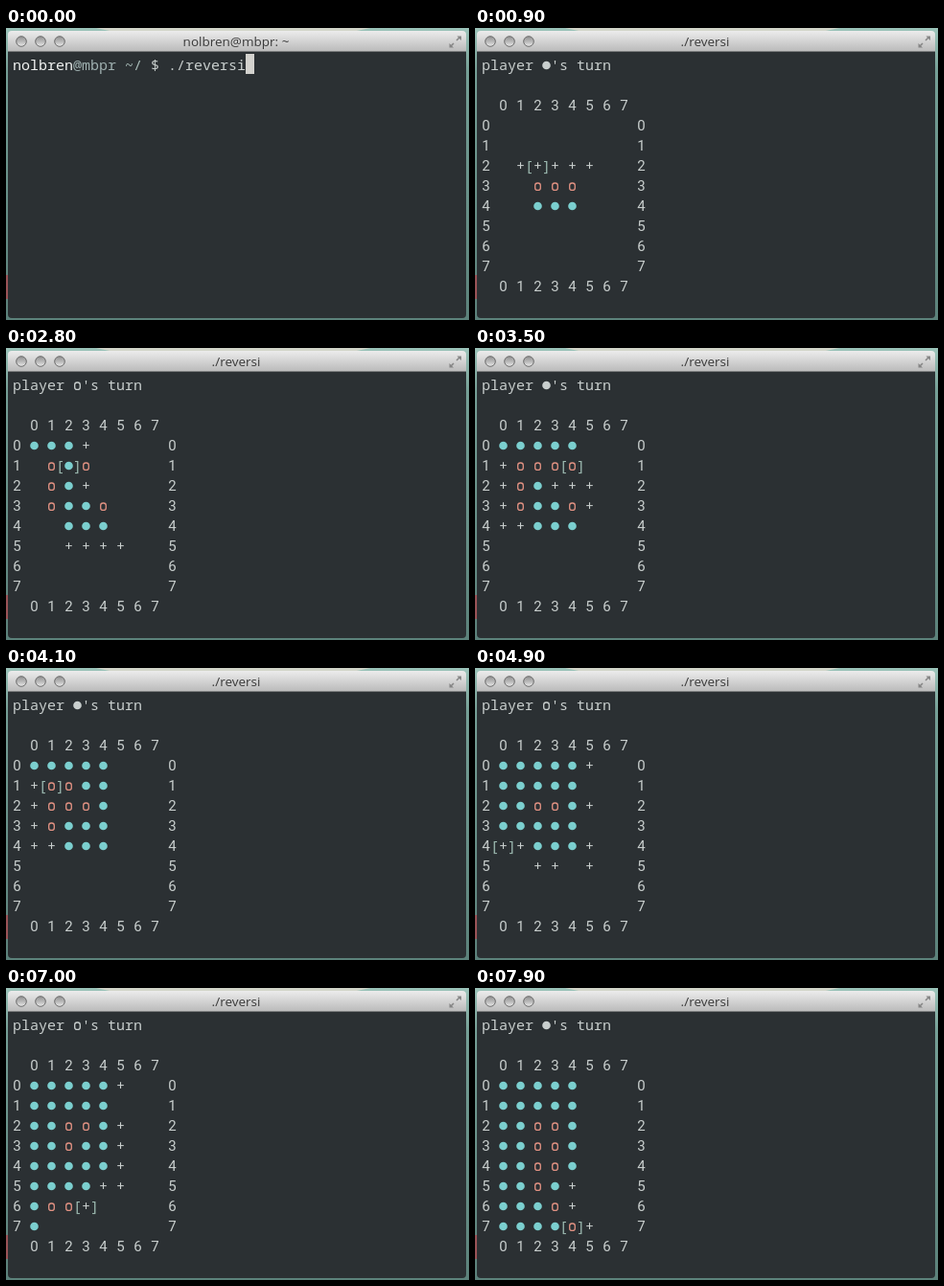
Write an HTML page that moves like this. It is 483 px wide and 305 px high and loops after 8000 ms.

```html
<!DOCTYPE html>
<html lang="en">
<head>
<meta charset="utf-8">
<title>./reversi</title>
<style>
  html, body { margin: 0; width: 100%; height: 100%; overflow: hidden; background: #7fa79d; }
  svg { display: block; width: 483px; height: 305px; }
  text { white-space: pre; text-anchor: middle; }
  #title { font: 13.5px "Open Sans", "Noto Sans", sans-serif; fill: #3a3a3a; }
  #screen { font: 15px "Noto Sans Mono", "DejaVu Sans Mono", monospace; fill: #c9cfce; }
  .digit { font-family: Roboto, "Liberation Sans", sans-serif; }
  .user { fill: #f1f3f2; }
  .host { fill: #9fb0b0; }
  .path { fill: #a9bdb9; }
  .mark { fill: #9dbab1; }
  .dark { fill: #7bcfcf; }
  .ring { fill: none; stroke: #c9cfce; stroke-width: 1.3; }
  .light { stroke: #e29283; }
</style>
</head>
<body>
<svg viewBox="0 0 483 305">
  <defs>
    <linearGradient id="bar" x2="0" y2="1">
      <stop offset="0" stop-color="#ececec"/>
      <stop offset="1" stop-color="#b9b9b9"/>
    </linearGradient>
    <linearGradient id="knob" x2="0" y2="1">
      <stop offset="0" stop-color="#8f8f8f"/>
      <stop offset=".55" stop-color="#bcbcbc"/>
      <stop offset="1" stop-color="#ededed"/>
    </linearGradient>
    <linearGradient id="desk" x2="0" y2="1">
      <stop offset="0" stop-color="#9cc4ba"/>
      <stop offset=".15" stop-color="#759f96"/>
      <stop offset="1" stop-color="#5c827b"/>
    </linearGradient>
  </defs>
  <rect width="483" height="305" fill="url(#desk)"/>
  <path d="M94 0H380L366 3H108Z" fill="#d3d6ca"/>
  <rect y="258" width="3" height="25" fill="#9b5357"/>
  <path d="M2 20H480V299a4 4 0 0 1-4 4H6a4 4 0 0 1-4-4Z" fill="#2b3033"/>
  <path d="M2 25V7a4 4 0 0 1 4-4H476a4 4 0 0 1 4 4V25Z" fill="url(#bar)"/>
  <rect x="2" y="24" width="478" height="1" fill="#77797a"/>
  <g fill="url(#knob)" stroke="#6c6c6c">
    <circle cx="16" cy="14" r="5.3"/>
    <circle cx="36" cy="14" r="5.3"/>
    <circle cx="56" cy="14" r="5.3"/>
  </g>
  <g fill="#858585" stroke="#858585" stroke-width="1.5">
    <path d="M470 13l3-3M467 16l-3 3" fill="none"/>
    <path d="M470.5 8.5h4.5v4.5ZM462.5 16v4.5h4.5Z" stroke="none"/>
  </g>
  <text id="title" x="240" y="18.5"></text>
  <g id="screen"></g>
</svg>
<script>
const CELL = 9, LINE = 21, SIZE = 8, STEP = 100, LOOP = 8000, START = 200;
const USER = "nolbren", HOST = "mbpr";

// One word per step: h j k l move the cursor, x places a piece, a dot waits.
const KEYS = `. h h x k x k x . jh x k x k x kh x l x l x . jl x h x kl x l .
  x j x j x h x kh h hx . j x j . x j x l . x jh x l x jlx hx . h x j x kl .
  kl x lx j x jh h x l x l x lx`.split(/\s+/);

const cellX = col => 7 + CELL * (col + .5);
const lineY = row => 39 + LINE * row;

const glyph = (ch, col, row, cls = "") => ch === " " ? "" :
  `<text x="${cellX(col)}" y="${lineY(row) + 5.3}" class="${/\d/.test(ch) ? "digit" : cls}">${ch}</text>`;

const write = (str, col, row, cls) =>
  [...str].map((ch, i) => glyph(ch, col + i, row, cls)).join("");

const disc = (col, row, cls = "") =>
  `<circle cx="${cellX(col)}" cy="${lineY(row)}" r="4.3" class="${cls}"/>`;

const ring = (col, row, cls = "") =>
  `<rect x="${cellX(col) - 2.8}" y="${lineY(row) - 3}" width="5.6" height="7.4" rx="2.5" class="ring ${cls}"/>`;

// Reversi rules: 1 is dark, -1 is light, 0 is empty.
const board = Array.from({ length: SIZE }, () => Array(SIZE).fill(0));
board[3][3] = board[4][4] = 1;
board[3][4] = board[4][3] = -1;
let turn = 1, curRow = 4, curCol = 4;

const at = (r, c) => board[r]?.[c] ?? 0;

function flips(r, c) {
  const found = [];
  if (at(r, c)) return found;
  for (let dr = -1; dr <= 1; dr++)
    for (let dc = -1; dc <= 1; dc++) {
      const run = [];
      let y = r + dr, x = c + dc;
      while (at(y, x) === -turn) {
        run.push([y, x]);
        y += dr;
        x += dc;
      }
      if (at(y, x) === turn) found.push(...run);
    }
  return found;
}

function press(key) {
  if (key === "h") curCol--;
  if (key === "l") curCol++;
  if (key === "k") curRow--;
  if (key === "j") curRow++;
  if (key !== "x") return;
  const taken = flips(curRow, curCol);
  if (!taken.length) return;
  for (const [r, c] of [[curRow, curCol], ...taken]) board[r][c] = turn;
  turn = -turn;
}

function drawGame() {
  let out = write("player", 0, 0) + (turn > 0 ? disc : ring)(7, 0) + write("'s turn", 8, 0);
  for (let i = 0; i < SIZE; i++) {
    out += glyph(String(i), 2 + 2 * i, 2) + glyph(String(i), 2 + 2 * i, 11);
    out += glyph(String(i), 0, 3 + i) + glyph(String(i), 18, 3 + i);
    for (let c = 0; c < SIZE; c++) {
      const col = 2 + 2 * c, row = 3 + i, piece = board[i][c];
      if (piece > 0) out += disc(col, row, "dark");
      else if (piece < 0) out += ring(col, row, "light");
      else if (flips(i, c).length) out += glyph("+", col, row);
    }
  }
  const col = 2 + 2 * curCol, row = 3 + curRow;
  return out + glyph("[", col - 1, row, "mark") + glyph("]", col + 1, row, "mark");
}

function drawShell() {
  const parts = [[USER, "user"], ["@" + HOST, "host"], [" ~/", "path"], [" $ ./reversi", ""]];
  let col = 0, out = "";
  for (const [str, cls] of parts) {
    out += write(str, col, 0, cls);
    col += str.length;
  }
  return out + `<rect x="${7 + CELL * col}" y="27" width="9" height="21" fill="#d3d2ce"/>`;
}

const scenes = [
  { time: 0, title: `${USER}@${HOST}: ~`, body: drawShell() },
  { time: START, title: "./reversi", body: drawGame() }
];
KEYS.forEach((word, i) => {
  if (word === ".") return;
  [...word].forEach(press);
  scenes.push({ time: START + STEP * (i + 1), title: "./reversi", body: drawGame() });
});

const title = document.getElementById("title");
const screenBox = document.getElementById("screen");
const begin = performance.now();
let shown;

function tick() {
  const time = (performance.now() - begin) % LOOP;
  const scene = scenes.findLast(s => s.time <= time);
  if (scene !== shown) {
    title.textContent = scene.title;
    screenBox.innerHTML = scene.body;
    shown = scene;
  }
  requestAnimationFrame(tick);
}
tick();
</script>
</body>
</html>
```
